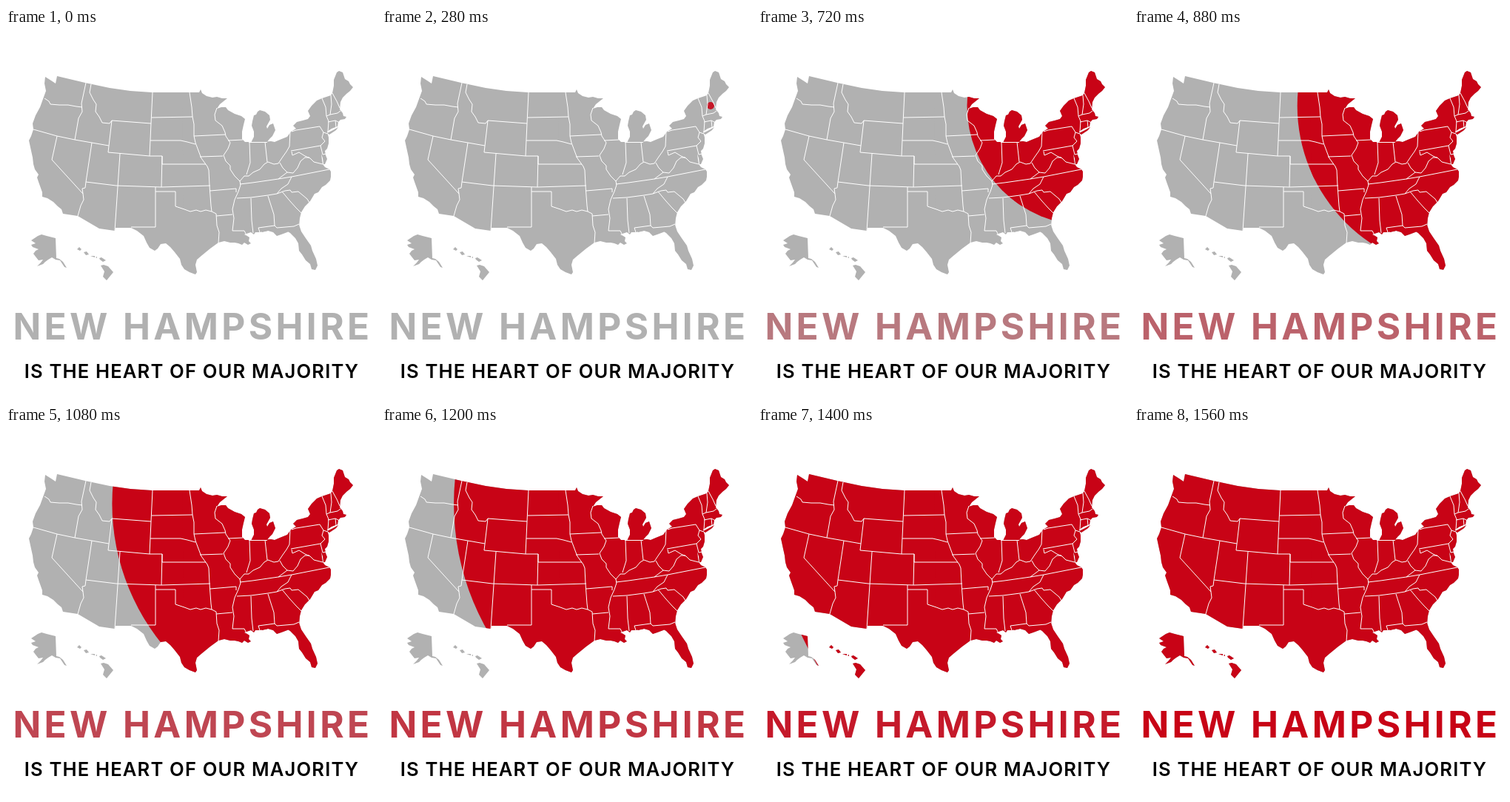
An HTML page for the animation above (2000 ms loop, 500 by 500 pixels).

```html
<!DOCTYPE html>
<html lang="en">
<head>
<meta charset="utf-8">
<style>
  html, body { margin: 0; width: 100%; height: 100%; overflow: hidden; background: #fff; }
  svg { display: block; width: 100vw; height: 100vh; }
  text { font-family: Inter, sans-serif; text-anchor: middle; }
  #title { font-size: 49.5px; font-weight: 700; letter-spacing: 4.4px; }
  #tagline { font-size: 25.6px; font-weight: 600; letter-spacing: 1.15px; }
  #borders { fill: none; stroke: #fff; stroke-width: 1; stroke-linejoin: round; }
</style>
</head>
<body>
<svg viewBox="0 0 500 500">
  <defs>
    <clipPath id="spread"><circle id="circle" cx="444" cy="105" r="5"/></clipPath>
    <g id="land">
      <!-- West -->
      <path d="M53,66 61,71 67,75 69,65 107,74 140,81 168,85 197,87 248,87 241,326 237,320 235,312 228,303 222,296 216,291 209,292 205,298 201,301 194,297 190,290 186,281 177,274 169,270 148,270 147,274 126,271 97,254 77,251 75,245 70,241 64,235 56,230 49,228 49,222 44,208 42,202 44,198 39,191 37,184 36,175 34,166 31,152 34,146 37,137 36,129 40,118 46,107 50,96 54,85 52,75z"/>
      <!-- Center -->
      <path d="M238,87 261,87 263,83 265,88 271,92 279,94 285,93 292,95 299,95 289,103 285,109 291,107 297,107 300,111 309,116 318,119 323,123 321,131 319,140 319,150 323,154 352,154 354,274 343,276 337,276 335,279 331,276 322,279 326,281 329,283 328,288 331,291 327,293 322,290 319,293 314,291 309,290 303,290 295,288 287,290 276,298 265,307 258,313 256,320 258,330 256,333 248,330 241,326z"/>
      <!-- East -->
      <path d="M346,154 358,153 363,154 370,151 380,147 385,140 392,136 388,132 393,127 401,125 408,123 411,119 408,112 413,105 420,98 427,95 439,91 441,88 443,78 443,70 447,60 450,58 455,60 458,69 463,72 465,76 469,80 465,85 460,89 455,94 452,100 451,110 455,115 456,119 460,120 458,123 452,124 449,127 448,133 440,136 434,140 436,148 436,156 434,163 431,166 432,172 434,177 431,184 429,184 428,176 426,170 427,178 428,184 431,188 437,191 439,194 439,201 438,206 432,212 427,215 422,222 417,224 411,234 404,241 399,249 397,257 396,268 380,276 372,279 366,281 361,276 354,274 346,276z"/>
      <!-- Florida, Michigan, Long Island -->
      <path d="M370,266 396,266 399,275 405,284 412,294 414,301 419,312 421,321 418,327 413,326 411,319 405,314 400,306 396,301 395,291 391,284 384,277 379,274 370,279z"/>
      <path d="M343,111 340,113 338,117 335,118 333,126 332,132 335,140 335,147 331,155 352,155 356,150 360,146 364,138 361,129 356,131 353,136 352,133 357,124 356,118 350,113z"/>
      <path d="M434,142 442,138 449,134 446,138 437,144z"/>
      <!-- Alaska -->
      <path d="M34,287 43,281 48,279 55,281 67,284 68,311 72,312 77,316 82,324 79,323 73,314 67,313 62,310 57,313 53,316 50,319 42,322 47,317 50,313 44,314 40,309 37,305 40,301 44,299 36,296 34,293 40,291z"/>
      <!-- Hawaii -->
      <path d="M96,299 99,296 102,299 100,301zM105,303 109,302 112,306 108,307zM114,308 120,308 120,310zM121,310 123,309 123,311zM126,311 129,310 135,314 131,316 127,313zM128,321 132,320 138,322 145,330 136,341 131,336 133,329z"/>
    </g>
  </defs>

  <use href="#land" fill="#b1b1b1"/>
  <g clip-path="url(#spread)"><use id="red" href="#land" fill="#c80316"/></g>

  <g id="borders">
    <!-- Pacific and mountain states -->
    <path d="M52,95 58,99 60,103 72,104 84,104 95,106 103,107M108,74 102,102 103,113 98,122 97,128 93,151M37,137 69,146 93,151 116,155 139,159M115,76 113,87 118,97 122,103 121,113 126,120 130,128 140,129 143,125 138,168 194,173M143,125 196,129M69,146 62,178 104,224 105,232 101,240 97,254M116,155 108,208 107,216 103,217 104,224M108,208 149,213 210,215 276,213M154,170 147,274M211,173 210,215"/>
    <!-- Plains -->
    <path d="M198,87 196,129 194,173 211,173 211,184 270,184M197,121 252,120M195,152 236,152 245,154 256,157M248,87 251,107 252,120 254,130 254,146 256,155 262,171 264,176 272,187 274,192 275,213 277,240 278,248M202,215 202,269 169,269M202,221 229,221 229,241 241,245 249,248 257,246 263,248 270,246 278,248 284,251 285,267 288,276 287,291"/>
    <!-- Mississippi valley -->
    <path d="M254,146 296,144M285,108 282,117 283,125 292,132 296,141 297,146 303,155 300,163 294,172 297,180 303,186 303,191 309,200 316,207 317,212 314,221 309,232 306,245 308,257 306,274 322,274 325,280M300,152 320,151M262,174 293,173M276,220 311,217 311,222M284,254 306,252"/>
    <!-- Ohio valley and South -->
    <path d="M316,207 322,200 328,200 334,195 343,191 349,184 354,181 362,184 368,183 374,174 379,167 383,160 384,140M329,154 330,182 325,198M350,154 353,181M328,154.5H353M316,211 333,209 368,204 386,201 437,191M368,204 380,195 374,189 370,182M312,230 331,229 354,226 366,224 372,217 381,211 386,201M366,224 377,220 384,219 386,222 395,221 407,231 410,236M373,221 383,233 392,243 399,250M331,230 332,260 334,277M354,227 362,252 363,267 341,270 343,276M363,267 366,270 389,268 396,265"/>
    <!-- Northeast -->
    <path d="M380,195 388,196 394,189 398,180 404,175 410,175M385,166 425,159 428,171 433,170M386,167 387,172 396,168 404,173 411,176 416,181 428,184M425,159 431,153 427,148 429,141M386,140 392,138 424,133 429,141 435,143M427,95 432,107 433,119 436,126 435,140M439,91 440,103 438,117M441,88 447,99 451,108M433,119 438,117 448,115 452,112M435,127 445,125 449,127M445,125 446,134"/>
  </g>

  <text id="title" x="252.5" y="421">NEW HAMPSHIRE</text>
  <text id="tagline" x="251" y="473">IS THE HEART OF OUR MAJORITY</text>
</svg>
<script>
  const LOOP = 2000, STEP = 40, SPREAD_START = 320, SPREAD_END = 1560;
  const GRAY = [177, 177, 177], RED = [200, 3, 22];
  const [circle, red, title] = ["circle", "red", "title"].map(id => document.getElementById(id));

  function draw(now) {
    const t = Math.min(SPREAD_END, Math.floor(now % LOOP / STEP) * STEP);
    const p = Math.max(0, (t - SPREAD_START) / (SPREAD_END - SPREAD_START));
    circle.setAttribute("r", p ? 7 + 479 * p : 5);
    red.setAttribute("opacity", Math.min(1, t / SPREAD_START));
    title.setAttribute("fill", `rgb(${GRAY.map((c, i) => Math.round(c + (RED[i] - c) * p))})`);
  }

  const start = performance.now();
  function tick() {
    draw(performance.now() - start);
    requestAnimationFrame(tick);
  }
  tick();
</script>
</body>
</html>
```
